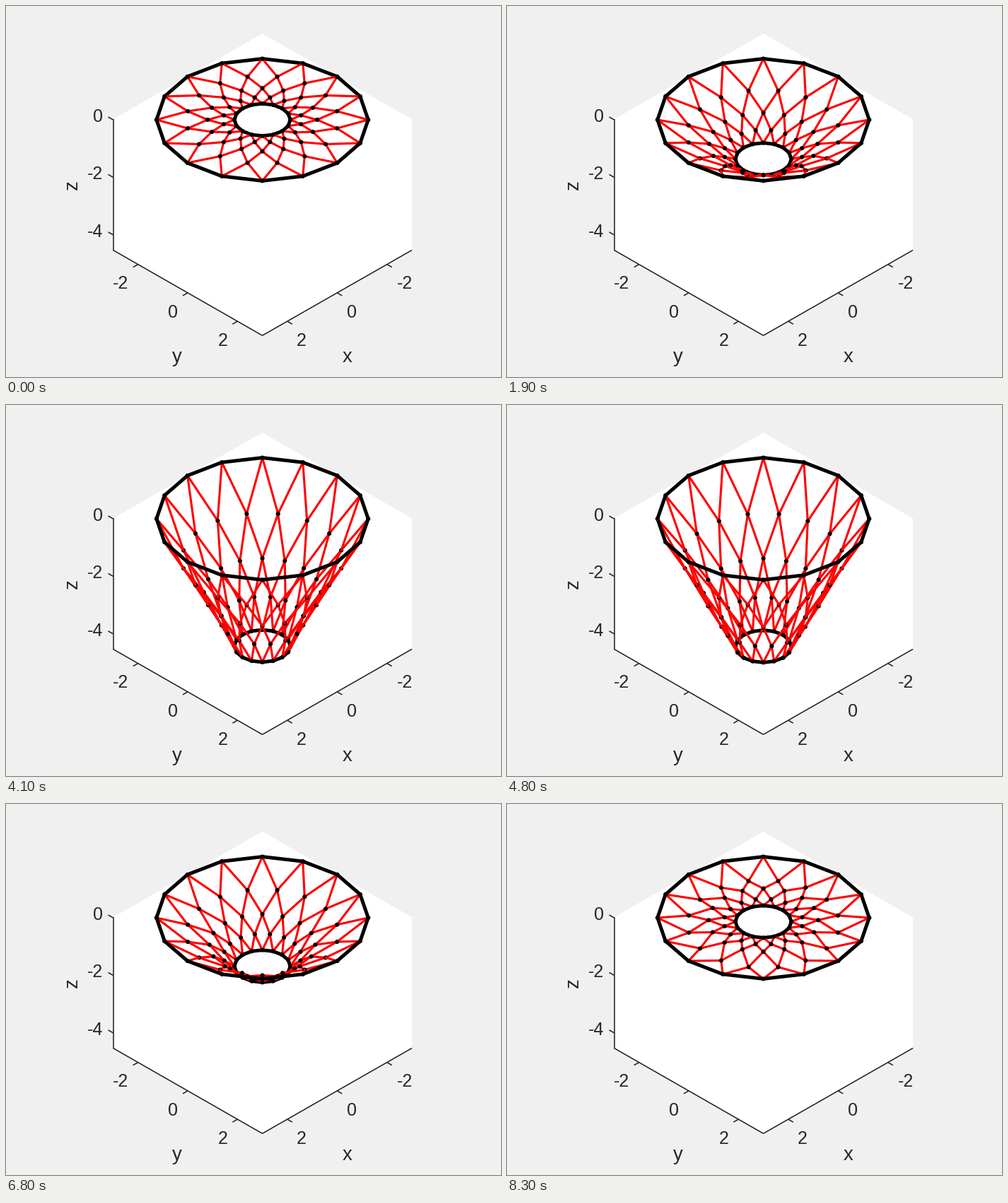
Animation, 700 px wide and 525 px high, one loop 8400 ms. Source, as a matplotlib script:

```python
import numpy as np
import matplotlib.pyplot as plt
from matplotlib.animation import FuncAnimation
from matplotlib.collections import LineCollection

W, H, DPI = 700, 525, 100
FRAMES, STEP = 84, 100
PX = 72 / DPI                       # points per pixel
CX, CY = 362.5, 161.0               # centre of the upper rim on screen
SX, SY, SZ = 49.9, 28.8, 40.72      # pixels per unit: across, into depth, height
N, ROWS = 16, 5
INK = "#262626"

# Height and radius of each row of knots at a few moments of the fall and rebound
T = np.array([0, .6, 1.2, 1.9, 3.2, 4.1, 4.5, 4.8, 5.5, 6.8, 7.6, 8.3])
DROP = np.array([
    [0, 5.6, 14, 20, 47.8, 57.4, 58.6, 57.5, 50.4, 21.9, 12.5, 8.9],
    [0, 5.7, 20, 34.2, 84.7, 103.8, 107, 105, 91, 38.2, 14.5, 3.3],
    [0, 5.7, 22, 46.5, 115, 144, 148.5, 146, 124.5, 54.4, 21, 5.6],
    [0, 5.7, 22.5, 55.5, 140.7, 180, 184.4, 180.5, 152.5, 68.5, 27, 5.5],
])
RADIUS = np.array([
    [2.155, 2.155, 2.155, 2.16, 2.295, 2.28, 2.27, 2.265, 2.26, 2.156, 2.155, 2.155],
    [1.55, 1.55, 1.545, 1.535, 1.655, 1.66, 1.68, 1.695, 1.70, 1.50, 1.53, 1.553],
    [1.115, 1.115, 1.115, 1.115, 1.17, 1.18, 1.20, 1.21, 1.22, 1.10, 1.11, 1.12],
])
R_TOP, R_RING = 3.0, 0.793


def ease(keys, t):
    """Smooth cubic curve through the key values, starting at rest."""
    m = np.gradient(keys, T, edge_order=2)
    m[0] = 0
    i = min(np.searchsorted(T, t, side="right") - 1, len(T) - 2)
    h = T[i + 1] - T[i]
    u = (t - T[i]) / h
    return ((2 * u**3 - 3 * u**2 + 1) * keys[i] + (u**3 - 2 * u**2 + u) * h * m[i]
            + (3 * u**2 - 2 * u**3) * keys[i + 1] + (u**3 - u**2) * h * m[i + 1])


def knots(t):
    """Screen positions and nearness of all knots, shaped (row, index)."""
    drop = np.array([0] + [ease(k, t) for k in DROP])[:, None]
    r = np.array([R_TOP] + [ease(k, t) for k in RADIUS] + [R_RING])[:, None]
    shift = (np.arange(ROWS) % 2 * 0.5)[:, None]
    a = (np.arange(N)[None, :] + shift) * 2 * np.pi / N
    pos = np.stack([CX + SX * r * np.sin(a), CY - SY * r * np.cos(a) + drop], -1)
    near = -0.816 * r * np.cos(a) - 0.577 * drop / SZ
    return pos, near


def build_parts():
    """Pairs of knots to join, with colour, width in pixels and nearness bias."""
    parts = []
    for i in range(ROWS - 1):
        for j in range(N):
            for k in (j, j + (1 if i % 2 else -1)):
                parts.append(((i, j), (i + 1, k % N), "#ff0000", 3.1, 0))
    for i in (0, ROWS - 1):
        for j in range(N):
            parts.append(((i, j), (i, (j + 1) % N), "#000000", 5.0, 0.05))
    for i in range(ROWS):
        for j in range(N):
            parts.append(((i, j), (i, j), "#000000", 6.2, 0.5))
    return parts


PARTS = build_parts()
A = np.array([p[0] for p in PARTS])
B = np.array([p[1] for p in PARTS])
COLORS = np.array([p[2] for p in PARTS])
WIDTHS = np.array([p[3] for p in PARTS]) * PX
BIAS = np.array([p[4] for p in PARTS])
IS_DOT = (A == B).all(axis=1)

fig = plt.figure(figsize=(W / DPI, H / DPI), dpi=DPI, facecolor="#f0f0f0")
ax = fig.add_axes([0, 0, 1, 1])
ax.set_xlim(0, W)
ax.set_ylim(H, 0)
ax.axis("off")


def line(x0, y0, x1, y1):
    ax.plot([x0, x1], [y0, y1], color=INK, lw=1.6 * PX, solid_capstyle="butt", zorder=2)


def label(x, y, s, size=25, **kw):
    ax.text(x, y, s, fontsize=size * PX, family="Liberation Sans", color=INK,
            ha="center", va="baseline", **kw)


# Box silhouette, axes and ticks
LEFT, RIGHT, TOP, LOW, BASE = 151.5, 574, 160.3, 345.5, 466.3
ax.fill([CX, RIGHT, RIGHT, CX, LEFT, LEFT], [39, TOP, LOW, BASE, LOW, TOP],
        color="white", lw=0, zorder=1)
line(LEFT, TOP, LEFT, LOW)
line(LEFT, LOW, CX, BASE)
line(CX, BASE, RIGHT, LOW)

for v, base in ((0, 164), (-2, 245), (-4, 327)):
    y = CY - v * SZ
    line(LEFT, y, LEFT - 7, y - 4)
    label(130.5 if v == 0 else 126, base, str(v))

for v, dx, base in ((-2, 201, 400), (0, 126.5, 441), (2, 55.5, 481)):
    u = (3 - v) / 6
    y = BASE + (LOW - BASE) * u
    for side, end in ((-1, LEFT), (1, RIGHT)):
        x = CX + (end - CX) * u
        line(x, y, x + side * 7, y + 4)
        label(CX + side * dx, base, str(v))

label(483, 503.5, "x", 27.5)
label(242, 503.5, "y", 27.5)
label(100.5, 253, "z", 27.5, rotation=90, rotation_mode="anchor")

net = LineCollection([], capstyle="round", zorder=3)
net.set_snap(False)
ax.add_collection(net, autolim=False)


def draw(n):
    pos, near = knots(n * STEP / 1000)
    a, b = tuple(A.T), tuple(B.T)
    segs = np.stack([pos[a], pos[b]], 1)
    segs[IS_DOT, 1, 0] += 0.1       # keeps a dot's round caps drawable
    order = np.argsort((near[a] + near[b]) / 2 + BIAS, kind="stable")
    net.set_segments(segs[order])
    net.set_color(COLORS[order])
    net.set_linewidth(WIDTHS[order])
    return [net]


anim = FuncAnimation(fig, draw, frames=FRAMES, interval=STEP, repeat=True, repeat_delay=0)
plt.show()
```
